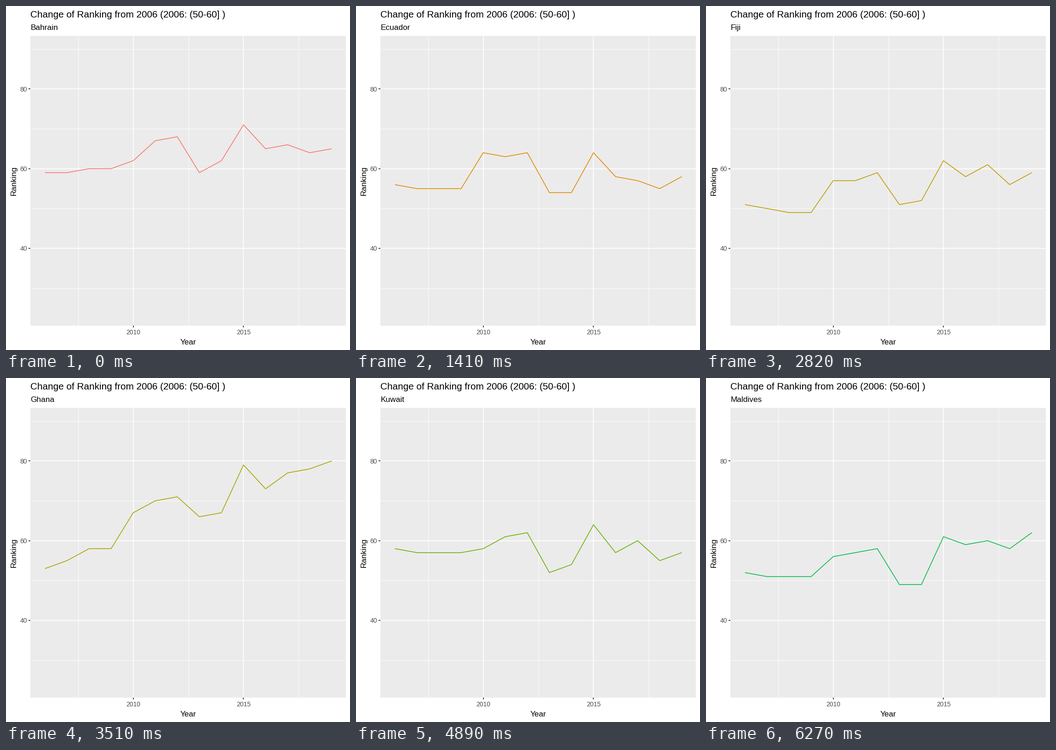
Animation, 748 px wide and 748 px high, one loop 6750 ms. Source, as a matplotlib script:

```python
import numpy as np
import matplotlib.pyplot as plt
from matplotlib.animation import FuncAnimation
from matplotlib.patches import Rectangle

SIZE, DPI = 748, 100
STEP = 30  # ms per frame
LOOP = 6750
HUES = 26  # size of the colour wheel the lines are taken from

plt.rcParams["font.family"] = "Liberation Sans"

LEFT, RIGHT, TOP, BOTTOM = 53.5, 739.5, 65, 694.5
YEARS = np.arange(2006, 2020)

SERIES = [
    ("Bahrain", "59 59 60 60 62 67 68 59 62 71 65 66 64 65"),
    ("Botswana", "51 50 51 51 61 63 64 56 56 67 62 64 59 62"),
    ("Ecuador", "56 55 55 55 64 63 64 54 54 64 58 57 55 58"),
    ("Eswatini (Swaziland)", "52 53 54 54 65 69 68 62 61 74 71 71 73 72"),
    ("Fiji", "51 50 49 49 57 57 59 51 52 62 58 61 56 59"),
    ("Ghana", "53 55 58 58 67 70 71 66 67 79 73 77 78 80"),
    ("Kenya", "52 53 55 55 65 67 69 62 63 74 69 72 71 72"),
    ("Kuwait", "58 57 57 57 58 61 62 52 54 64 57 60 55 57"),
    ("Malawi", "51 50 52 52 63 66 67 60 60 72 67 70 68 69"),
    ("Maldives", "52 51 51 51 56 57 58 49 49 61 59 60 58 62"),
]
STARTS = [690 * k + 30 * min(max(k - 1, 0), 2) for k in range(len(SERIES))]


def px(year):
    return LEFT + (np.asarray(year) - 2005.35) / 14.3 * (RIGHT - LEFT)


def py(rank):
    return TOP + (93.3 - np.asarray(rank)) / 72.6 * (BOTTOM - TOP)


def pt(pixels):
    return pixels * 72 / DPI


def hcl(hue, chroma=100, lum=65):
    """Polar LUV to clipped sRGB."""
    white_u, white_v = 0.1978, 0.4683
    h = np.radians(hue)
    u = chroma * np.cos(h) / (13 * lum) + white_u
    v = chroma * np.sin(h) / (13 * lum) + white_v
    y = ((lum + 16) / 116) ** 3
    x = 9 * y * u / (4 * v)
    z = y * (12 - 3 * u - 20 * v) / (4 * v)
    rgb = np.array([
        3.2406 * x - 1.5372 * y - 0.4986 * z,
        -0.9689 * x + 1.8758 * y + 0.0415 * z,
        0.0557 * x - 0.2040 * y + 1.0570 * z,
    ])
    rgb = np.clip(rgb, 0, 1)
    return np.where(rgb > 0.0031308, 1.055 * rgb ** (1 / 2.4) - 0.055, 12.92 * rgb)


fig = plt.figure(figsize=(SIZE / DPI, SIZE / DPI), dpi=DPI, facecolor="white")
ax = fig.add_axes([0, 0, 1, 1])
ax.set_xlim(0, SIZE)
ax.set_ylim(SIZE, 0)
ax.axis("off")


def segment(xs, ys, color, width, z):
    ax.plot(xs, ys, color=color, lw=pt(width), solid_capstyle="butt", zorder=z)


def label(x, y, text, size, color="black", **kw):
    kw.setdefault("va", "baseline")
    return ax.text(x, y, text, fontsize=pt(size), color=color, **kw)


ax.add_patch(Rectangle((LEFT, TOP), RIGHT - LEFT, BOTTOM - TOP,
                       facecolor="#EBEBEB", lw=0, zorder=0))

for year in (2007.5, 2012.5, 2017.5):
    segment([px(year)] * 2, [TOP, BOTTOM], "white", 0.85, 1)
for rank in (30, 50, 70, 90):
    segment([LEFT, RIGHT], [py(rank)] * 2, "white", 0.85, 1)
for year in (2010, 2015):
    x = px(year)
    segment([x, x], [TOP, BOTTOM], "white", 1.7, 2)
    segment([x, x], [BOTTOM, BOTTOM + 4.3], "#333333", 1.7, 2)
    label(x, 713.7, str(year), 13.85, "#4D4D4D", ha="center")
for rank in (40, 60, 80):
    y = py(rank)
    segment([LEFT, RIGHT], [y, y], "white", 1.7, 2)
    segment([LEFT - 4.3, LEFT], [y, y], "#333333", 1.7, 2)
    label(46, y + 5.2, str(rank), 13.85, "#4D4D4D", ha="right")

label(53.5, 25.3, "Change of Ranking from 2006 (2006: (50-60] )", 20.75)
label(396.5, 736, "Year", 17.3, ha="center")
label(22.5, 380, "Ranking", 17.3, rotation=90, ha="right", va="center",
      rotation_mode="default").set(ha="left", x=9.5)

subtitle = label(53.5, 52.3, "", 17.3)
line, = ax.plot([], [], lw=pt(1.6), solid_capstyle="butt",
                solid_joinstyle="round", zorder=3)


def update(i):
    k = np.searchsorted(STARTS, i * STEP, side="right") - 1
    name, ranks = SERIES[k]
    subtitle.set_text(name)
    line.set_data(px(YEARS), py([int(r) for r in ranks.split()]))
    line.set_color(hcl(15 + 360 * k / HUES))
    return subtitle, line


anim = FuncAnimation(fig, update, frames=LOOP // STEP, interval=STEP,
                     repeat=True, repeat_delay=0)
plt.show()
```
